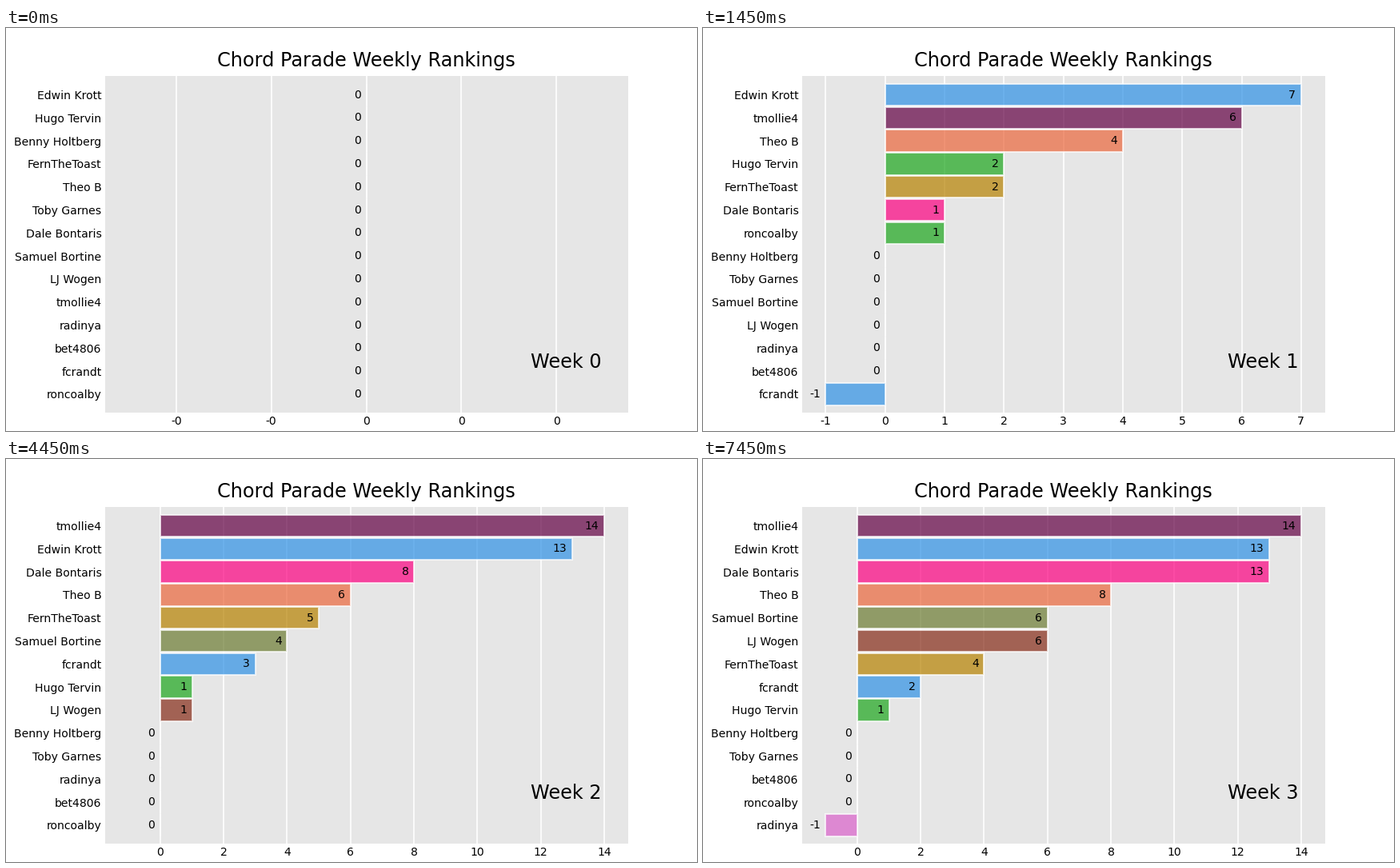
A matplotlib script for the animation above (8000 ms loop, 864 px wide and 504 px high).

```python
import matplotlib.pyplot as plt
import numpy as np
from matplotlib.animation import FuncAnimation
from matplotlib.ticker import FuncFormatter

W, H, DPI = 864, 504, 144
INTERVAL, FRAMES = 50, 160
STEPS = 20                 # animation steps from one week to the next
STARTS = (10, 70, 130)     # frames on which a new week begins to move in

# name, bar colour, score after each week
PLAYERS = [
    ("Edwin Krott", "#2E91E5", (0, 7, 13, 13)),
    ("Hugo Tervin", "#1CA71C", (0, 2, 1, 1)),
    ("Benny Holtberg", "#DA16FF", (0, 0, 0, 0)),
    ("FernTheToast", "#B68100", (0, 2, 5, 4)),
    ("Theo B", "#EB663B", (0, 4, 6, 8)),
    ("Toby Garnes", "#00A08B", (0, 0, 0, 0)),
    ("Dale Bontaris", "#FC0080", (0, 1, 8, 13)),
    ("Samuel Bortine", "#6C7C32", (0, 0, 4, 6)),
    ("LJ Wogen", "#862A16", (0, 0, 1, 6)),
    ("tmollie4", "#620042", (0, 6, 14, 14)),
    ("radinya", "#DA60CA", (0, 0, 0, -1)),
    ("bet4806", "#0D2A63", (0, 0, 0, 0)),
    ("fcrandt", "#2E91E5", (0, -1, 3, 2)),
    ("roncoalby", "#1CA71C", (0, 1, 0, 0)),
]
names, colors, scores = zip(*PLAYERS)
scores = np.array(scores, float).T
weeks, n = scores.shape


def places(row):
    """Bar heights n..1, best score on top, ties in list order."""
    place = np.empty(n)
    place[np.argsort(-row, kind="stable")] = np.arange(n, 0, -1)
    return place


def spread(table):
    """Linear steps between the weekly rows."""
    keys = np.arange(weeks) * STEPS
    steps = np.arange(keys[-1] + 1)
    return np.column_stack([np.interp(steps, keys, col) for col in table.T])


values = spread(scores)
ranks = spread(np.array([places(row) for row in scores]))

# The axis only ever grows to hold what it has shown so far.
lows = np.minimum.accumulate(values.min(axis=1).clip(max=0))
highs = np.maximum.accumulate(values.max(axis=1).clip(min=0))


def x_limits(step):
    lo, hi = lows[step], highs[step]
    if lo == hi:
        lo, hi = -0.05, 0.05
    pad = 0.05 * (hi - lo)
    return lo - pad, hi + pad


fig = plt.figure(figsize=(W / DPI, H / DPI), dpi=DPI, facecolor="white")
left, bottom, right, top = 123.52 / W, 23 / H, 0.9, 0.88
ax = fig.add_axes([left, bottom, right - left, top - bottom], facecolor="0.9")
ax.set_title("Chord Parade Weekly Rankings", fontsize=12)
ax.set_axisbelow(True)
ax.grid(True, axis="x", color="white")
ax.tick_params(length=0, labelsize=7, pad=2)
for spine in ax.spines.values():
    spine.set_visible(False)

bars = ax.barh(ranks[0], values[0], height=0.95, color=colors,
               edgecolor="white", linewidth=1, alpha=0.7)
labels = [ax.text(0, 0, "", fontsize=7, ha="right", va="center")
          for _ in names]
week = ax.text(0.95, 0.15, "", transform=ax.transAxes, fontsize=12,
               ha="right", va="center")
ax.set_ylim(0.2, n + 0.8)
ax.xaxis.set_major_formatter(FuncFormatter(lambda x, pos: f"{x:,.0f}"))


def update(frame):
    step = sum(min(max(frame - start + 1, 0), STEPS) for start in STARTS)
    lo, hi = x_limits(step)
    ax.set_xlim(lo, hi)
    ax.set_yticks(ranks[step])
    ax.set_yticklabels(names)
    gap = 0.01 * (hi - lo)
    for bar, label, x, y in zip(bars, labels, values[step], ranks[step]):
        bar.set_width(x)
        bar.set_y(y - bar.get_height() / 2)
        label.set_position((x - gap, y))
        label.set_text(f"{x:,.0f}")
    week.set_text(f"Week {step // STEPS}")
    return [*bars, *labels, week]


anim = FuncAnimation(fig, update, frames=FRAMES, interval=INTERVAL,
                     init_func=lambda: update(0), repeat=True,
                     repeat_delay=0, blit=False)
plt.show()
```
